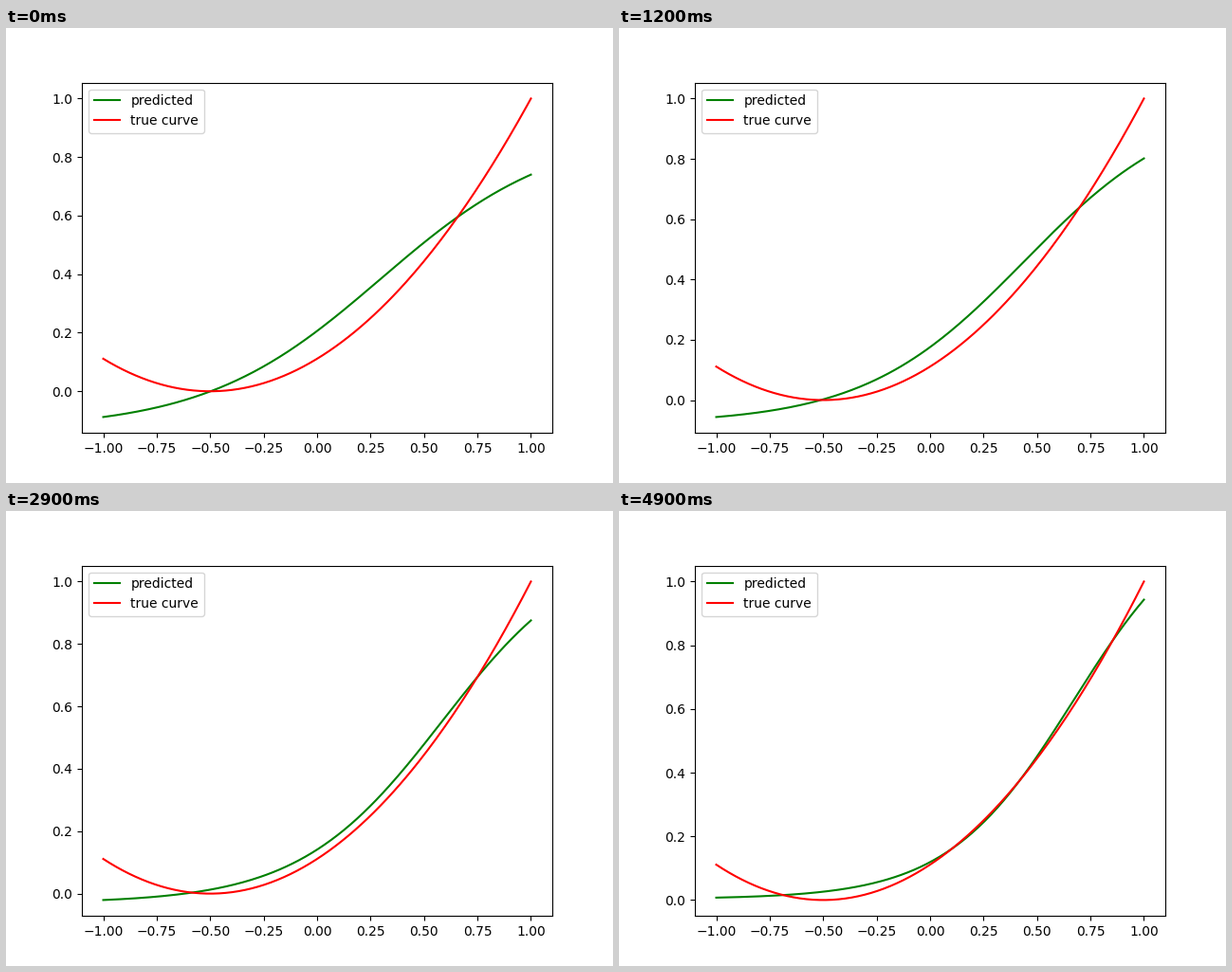
A matplotlib script for the animation above (5000 ms loop, 640x480 px).

```python
import numpy as np
import matplotlib.pyplot as plt
from matplotlib.animation import FuncAnimation

FRAMES = 50
INTERVAL = 100

x = np.linspace(-1, 1, 200)
true_curve = (x + 0.5) ** 2 / 2.25


def ease(start, end, u, speed=1.0):
    """Quadratic ease; speed is the initial rate relative to linear."""
    return start + (end - start) * (speed * u + (1 - speed) * u ** 2)


def prediction(step):
    """Sigmoid fitted between two moving end heights."""
    u = step / (FRAMES - 1)
    left = ease(-0.088, 0.0075, u, 1.475)
    right = ease(0.740, 0.943, u, 1.31)
    steepness = ease(2.43, 3.40, u)
    centre = ease(0.297, 0.67, u, 1.75)
    s = 1 / (1 + np.exp(-steepness * (x - centre)))
    return left + (right - left) * (s - s[0]) / (s[-1] - s[0])


fig, ax = plt.subplots(figsize=(6.4, 4.8), dpi=100)
predicted_line, = ax.plot(x, prediction(0), color="green", label="predicted")
ax.plot(x, true_curve, color="red", label="true curve")
ax.legend(loc="upper left")


def update(step):
    predicted_line.set_ydata(prediction(step))
    ax.relim()
    ax.autoscale_view()
    return predicted_line,


anim = FuncAnimation(fig, update, frames=FRAMES, interval=INTERVAL,
                     repeat=True, repeat_delay=0, blit=False)
plt.show()
```
